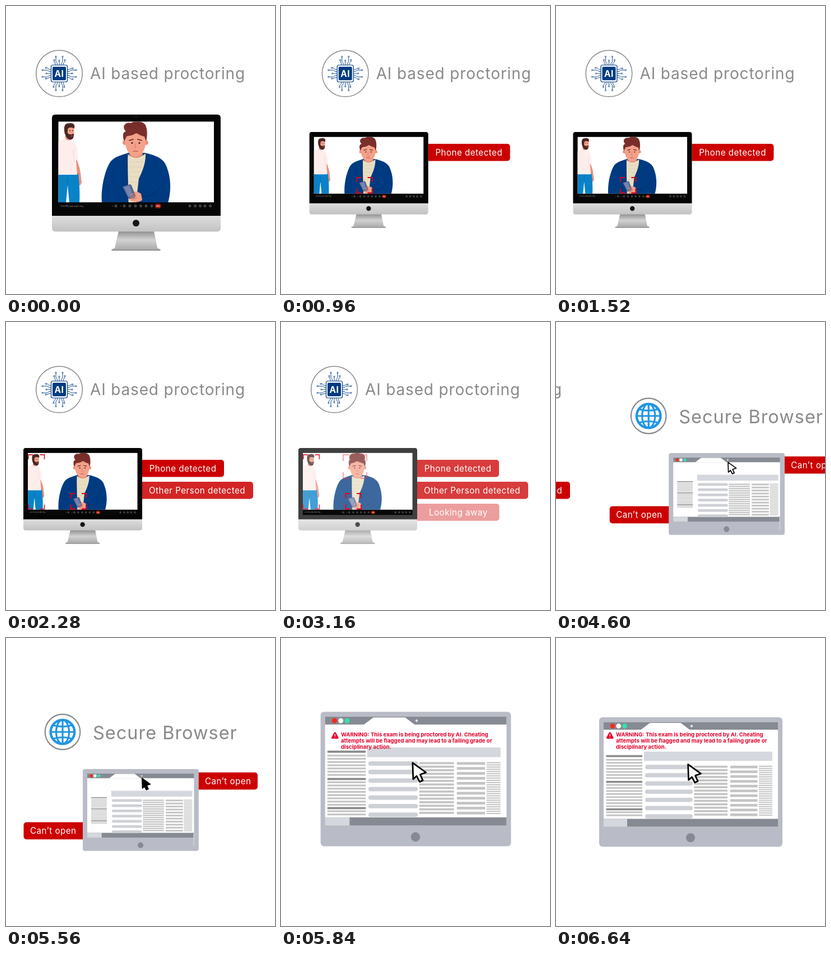
An HTML page that plays this animation: 480x512 px, repeating every 7.44 s.

```html
<!DOCTYPE html>
<html lang="en">
<head>
<meta charset="utf-8">
<title>Proctoring</title>
<style>
  html, body { margin: 0; width: 100%; height: 100%; overflow: hidden; background: #fff; }
  svg { display: block; width: 100vw; height: 100vh; }
  text { font-family: Inter, "Liberation Sans", sans-serif; letter-spacing: .03em; }
  .title { fill: #8a8a8d; }
  .tag { font-size: 15.2px; fill: #fff; }
  .warn { font-size: 9.65px; font-weight: 700; fill: #e4002b; letter-spacing: 0; }
</style>
</head>
<body>
<svg id="stage" viewBox="0 0 480 512" xmlns="http://www.w3.org/2000/svg"></svg>
<script>
const NAVY = '#003c82', RED = '#cc0000', GREY = '#8a8a8d', SKIN = '#f4a18a';
const LOOP = 7440;

const rect = (x, y, w, h, fill, r = 0) =>
  `<rect x="${x}" y="${y}" width="${w}" height="${h}" rx="${r}" fill="${fill}"/>`;
const dot = (x, y, r, fill) => `<circle cx="${x}" cy="${y}" r="${r}" fill="${fill}"/>`;
const path = (d, fill) => `<path d="${d}" fill="${fill}"/>`;
const line = (d, stroke, w = 1) =>
  `<path d="${d}" fill="none" stroke="${stroke}" stroke-width="${w}" stroke-linecap="round" stroke-linejoin="round"/>`;
const text = (x, y, s, cls, more = '') => `<text x="${x}" y="${y}" class="${cls}" ${more}>${s}</text>`;
const group = (body, more = '') => `<g ${more}>${body}</g>`;
const repeat = (n, f) => Array.from({ length: n }, (_, i) => f(i)).join('');

const tag = (x, y, w, tx, s) => rect(x, y, w, 30.5, RED, 5) + text(tx, y + 20.6, s, 'tag');

function bracket(x, y, w, h, c = 8) {
  const r = x + w, b = y + h;
  return `<path fill="none" stroke="#d4061c" stroke-width="1.8" d="M${x} ${y + c}V${y}H${x + c}M${r - c} ${y}H${r}V${y + c}
    M${r} ${b - c}V${b}H${r - c}M${x + c} ${b}H${x}V${b - c}"/>`;
}

function chip() {
  const ends = [[-9, -24], [-6, -30], [0, -23], [6, -30], [10, -24]];
  const wires = ends.map(([x, y], i) =>
    line(`M${(i - 2) * 3.5} -15V-18L${x} -21V${y + 1}`, NAVY, .9) +
    `<circle cx="${x}" cy="${y}" r="1.1" fill="#fff" stroke="${NAVY}" stroke-width=".8"/>`).join('');
  return group(
    repeat(4, i => group(wires, `transform="rotate(${i * 90})"`)) +
    `<rect x="-14.5" y="-15" width="29" height="30" rx="3" fill="#fff" stroke="${NAVY}" stroke-width="1.2"/>` +
    rect(-12, -12, 24, 24, NAVY, 2) +
    text(0, 5.6, 'AI', '', 'font-size="15.5" font-weight="700" fill="#fff" text-anchor="middle"'),
    'transform="translate(95 120)"');
}

const header = () =>
  `<circle cx="95" cy="120" r="41.3" fill="#fff" stroke="${GREY}" stroke-width="1.5"/>` + chip() +
  text(150, 130, 'AI based proctoring', 'title', 'font-size="28"');

function head(away) {
  const body =
    dot(212, 243, 4, '#ee917c') + dot(250, 243, 4, '#ee917c') +
    path('M213 226C211 249 215 264 231 268C247 265 251 249 249 226Z', SKIN) +
    path('M211 241C207 229 209 224 214 223C205 214 214 205 223 208C231 203 246 205 249 212C253 220 252 232 250 241L247 232C240 231 236 227 232 226C226 231 219 230 215 232Z', '#7a2f2b') +
    line('M216 214C224 212 230 216 234 221M229 209C238 210 243 215 244 221', '#602322', .8) +
    line('M220 239L227 237M235 237L242 239', '#5a221f', 1.6) +
    dot(225, 243.5, 1.5, '#35191c') + dot(238, 243.5, 1.5, '#35191c') +
    line('M231 245L229.5 251.5L232.5 252', '#d97866', 1) +
    line('M227 258.5Q231 257 235 258.5', '#a9443f', 1.1);
  return group(body, away ? 'transform="translate(462 0) scale(-1 1)"' : '');
}

const student = away =>
  path('M171 350C169 322 177 290 187 276C195 267 207 265 218 261H248C260 264 277 268 284 280C294 300 296 326 289 350Z', '#003a80') +
  path('M217 263C225 271 241 270 249 262C250 278 243 295 237 307L232 350H218Z', '#e9dec3') +
  line('M221 277H245M221 286H242M221 295H240M221 304H237M221 313H233', '#d9cba9', .8) +
  path('M220 252H244V264C239 272 226 272 220 264Z', '#e88d79') +
  head(away) +
  line('M217 265C215 290 218 320 218 350', '#002c66', 1) +
  line('M278 318C270 334 254 340 243 338', '#002c66', 1) +
  path('M219 333C224 328 236 329 241 334L243 345C236 350 227 350 221 345Z', SKIN) +
  path('M208 321L221 317Q223 317 224 319L231 337Q231 340 228 341L219 343Z', '#56658f') +
  path('M210 322L220 319L227 337L219 340Z', '#7484ad') +
  line('M222 336L230 333M223 340L232 337M225 344L233 341', '#d97d69', 1.6);

const visitor = () =>
  path('M125 268L132 290L135 313Q133 322 129 317L125 296Z', '#ea937e') +
  path('M92 298H129C131 315 132 333 131 350H113L110 318L107 350H92Z', '#0a82c8') +
  line('M110 304V320', '#066aa8', 1) +
  path('M92 242C100 236 106 236 110 235C119 237 125 243 127 254L129 272L125 275L127 300H92Z', '#fdeeec') +
  line('M120 256L122 277', '#ecd3d0', 1) +
  path('M106 224H118V236C114 240 109 239 106 236Z', '#e58f7b') +
  path('M106 214C108 209 120 210 121 215L121.5 228C119 237 111 238 107 231Z', SKIN) +
  path('M105 228C102 213 105 208 113 208.5C121 207 124 212 121.5 218C117 215 112 216 110.5 218L109.5 226Z', '#4b2723') +
  path('M105.5 226L109.5 225C112 230 117 228 121 227C121.5 234 119 238 114.5 237.5C108 236 106 231 105.5 226Z', '#4b2723') +
  dot(114, 221.5, .9, '#2b1716') + dot(119, 221.5, .9, '#2b1716') +
  line('M115.5 231H119', '#c86d60', 1);

function callBar() {
  const icon = x => `<circle cx="${x}" cy="355.5" r="1.8" fill="#222" stroke="#888" stroke-width=".8"/>`;
  return rect(93.5, 349, 277.5, 13, '#080808') +
    text(97.5, 357, '6:30 PM | app-math-msg', '', 'font-size="3.2" fill="#aaa"') +
    [196, 211, 221, 231, 240.5, 250, 260, 328, 337.5, 346.5, 355, 364.5].map(icon).join('') +
    line('M189.5 355.5H191M204.5 355.5H206', '#777', .7) +
    rect(266, 351.5, 10.5, 8, '#b3200f', 4) + line('M269 356Q271.2 354.4 273.5 356', '#fff', 1.1);
}

const desktop = away =>
  path('M201 400H264L270 430L276 433Q276 435 272 435H192Q188 435 188 433L194 430Z', 'url(#stand)') +
  line('M189 433.8H275', '#777', .8) +
  rect(82, 193, 301, 208, 'url(#chin)', 6) +
  path('M82 373V199Q82 193 88 193H377Q383 193 383 199V373Z', '#050505') +
  dot(232, 198, 1.2, '#26262c') +
  rect(93.5, 205.5, 277.5, 143.5, '#fff') +
  group(visitor() + student(away), 'clip-path="url(#screen)"') +
  callBar() + dot(232, 386, 6, '#161616');

const SMALL = 'transform="translate(-26.75 88.07) scale(.7043)"';

function watch(away) {
  const phone = tag(232, 245, 157, 255.7, 'Phone detected');
  const other = tag(232, 284, 209, 255, 'Other Person detected');
  const side = bracket(40, 236, 28.5, 96.5);
  const look = away ? tag(232, 323, 157.5, 264, 'Looking away') : '';
  return phone + group(other, 'class="other"') + look + group(desktop(away), SMALL) +
    bracket(115.5, 305, 27.5, 27.5) + group(side, 'class="other"') +
    (away ? bracket(111, 236, 42, 42, 11) : '');
}

function globe() {
  const ring = (rx, w) => `<ellipse rx="${rx}" ry="21.3" fill="none" stroke="#2196e3" stroke-width="${w}"/>`;
  return `<circle cx="101" cy="167" r="31.3" fill="#fff" stroke="${GREY}" stroke-width="2.2"/>` +
    group(ring(21.3, 4.4) + ring(11.5, 3.2) +
      line('M0 -21V21M-21 0H21M-17 -12Q0 -7 17 -12M-17 12Q0 7 17 12', '#2196e3', 3.2),
      'transform="translate(101 167)"');
}

const bars = (x, y, w, h, step, n, c = '#c4c4c4', r = 0) =>
  repeat(n, i => rect(x, y + i * step, w, h, c, r));

// Parts of the browser; each one zooms from its own place.
const shell = () => rect(77, 141, 327, 230, '#b9bcc6', 6) + dot(240, 355, 8, '#868a92');

const page = () =>
  rect(85, 149.5, 311, 186, '#fff') + rect(85, 149.5, 311, 13.5, '#868a92') +
  rect(85, 321.5, 311, 14, '#868a92') + rect(85, 321.5, 42, 14, '#d4d7dd');

const tabs = () =>
  path('M151 163.5L166 152Q167 151 169 151H221Q223 151 224 152L239 163.5Z', '#fff') +
  dot(101, 156.5, 4.4, '#fb2a1c') + dot(111.7, 156.5, 4.4, '#fff') + dot(122.6, 156.5, 4.4, '#37dfab') +
  line('M240 156.5H244M242 154.5V158.5', '#fff', 1.3);

const columns = () =>
  rect(157, 202, 229, 16.5, '#d4d7dd') + bars(159, 225.6, 85, 7.6, 14.6, 7, '#cdd0d5', 3.8) +
  bars(246.5, 227, 59.5, 3.6, 6.08, 15) + bars(311, 227, 48.5, 4.6, 8.5, 11) + bars(362, 227, 24, 2, 3.78, 24);

const sidebar = () =>
  [208.2, 254, 302.8].map(y => rect(89.5, y, 64.5, 3.5, '#898989')).join('') +
  bars(89.5, 215, 64.5, 3, 5.4, 7) + bars(89.5, 259.7, 64.5, 3, 5.4, 8) + bars(89.5, 308.3, 64.5, 3, 5.4, 2);

const ARROW = 'M0 0L1 28L7 22.5L12 32.5L17.5 30L13 20L23 16.5Z';

// id, drawing, point before, same point after, scale before
const parts = [
  ['shell', shell(), [137, 233], [77, 141], .6325],
  ['page', page(), [145, 241], [85, 149.5], .6125],
  ['columns', columns(), [137, 233], [77, 141], .6325],
  ['sidebar', sidebar(), [152, 283], [89.5, 208.2], .433],
  ['tabs', tabs(), [152, 245.1], [101, 156.5], .64],
];

const warning = () =>
  path('M96.3 167.2Q97.2 167.2 97.7 168L102.6 177Q103.2 179 101.3 179H91.3Q89.4 179 90 177L94.9 168Q95.4 167.2 96.3 167.2Z', '#e4002b') +
  line('M96.3 171V174.3M96.3 176.7V176.8', '#fff', 1.3) +
  ['WARNING: This exam is being proctored by AI. Cheating',
   'attempts will be flagged and may lead to a failing grade or',
   'disciplinary action.'].map((s, i) => text(107, 175.4 + i * 10.6, s, 'warn')).join('');

const stage = document.getElementById('stage');
stage.innerHTML = `<defs>
  <linearGradient id="chin" x2="0" y2="1"><stop offset=".86" stop-color="#dedede"/><stop offset="1" stop-color="#c2c2c2"/></linearGradient>
  <linearGradient id="stand" x2="0" y2="1"><stop offset="0" stop-color="#8f8f8f"/><stop offset=".45" stop-color="#d2d2d2"/><stop offset="1" stop-color="#a6a6a6"/></linearGradient>
  <clipPath id="screen"><rect x="93.5" y="205.5" width="277.5" height="143.5"/></clipPath></defs>` +
  group(header() + desktop(false), 'id="intro"') +
  group(header() + group(watch(false), 'id="before"') + group(watch(true), 'id="after"') +
    group(callBar(), SMALL) + bracket(115.5, 305, 27.5, 27.5), 'id="watch"') +
  group(
    group(globe() + text(155, 179.5, 'Secure Browser', 'title', 'font-size="32.5"') +
      tag(335, 239, 114, 355, 'Can’t open') + tag(31.5, 327.5, 115, 43, 'Can’t open'), 'id="extras"') +
    parts.map(([id, body]) => group(body, `id="${id}"`)).join('') +
    group(rect(334.5, 347, 1, 23, '#dfe1e5'), 'id="edge"') +
    group(warning(), 'id="warning"') +
    `<path id="arrow" d="${ARROW}" stroke="#000" stroke-width="2.7" stroke-linejoin="round"/>`, 'id="secure"');

const $ = id => document.getElementById(id);
const clamp = v => Math.max(0, Math.min(1, v));
const mix = (a, b, p) => a + (b - a) * p;
const fade = (id, v) => $(id).setAttribute('opacity', clamp(v).toFixed(3));
const others = [...document.querySelectorAll('.other')];

// Spring with stiffness 300, damping 20, mass 1.
function spring(ms) {
  if (ms <= 0) return 0;
  if (ms > 760) return 1;
  const t = ms / 1000, w = Math.sqrt(200);
  return 1 - Math.exp(-10 * t) * (Math.cos(w * t) + 10 / w * Math.sin(w * t));
}
const easeOut = x => 1 - (1 - clamp(x)) ** 1.7;

function slide(id, x, shown) {
  const el = $(id);
  el.setAttribute('transform', `translate(${x.toFixed(2)} 0)`);
  el.style.display = shown ? '' : 'none';
}

function grow(id, [x0, y0], [x1, y1], scale, p) {
  $(id).setAttribute('transform',
    `translate(${mix(x0, x1, p)} ${mix(y0, y1, p)}) scale(${mix(scale, 1, p)}) translate(${-x1} ${-y1})`);
}

function draw(t) {
  const toWatch = spring(t - 816.5), toSecure = spring(t - 4474.5);
  slide('intro', -480 * toWatch, t < 1600);
  slide('watch', 480 * (1 - toWatch) - 480 * toSecure, t > 800 && t < 5300);
  slide('secure', 480 * (1 - toSecure), t > 4460);

  const second = easeOut((t - 1945) / 500);
  others.forEach(el => el.setAttribute('opacity', second.toFixed(3)));
  const third = easeOut((t - 3098) / 255);
  fade('before', 1 - third);
  fade('after', third);

  const zoom = spring(t - 5630);
  parts.forEach(([id, , from, to, scale]) => grow(id, from, to, scale, zoom));
  fade('extras', 1 - zoom);
  fade('edge', 1 - zoom * 4);
  fade('warning', zoom);
  const tone = t < 5560 ? 255 : Math.round(255 * clamp(zoom));
  $('arrow').setAttribute('fill', `rgb(${tone},${tone},${tone})`);
  $('arrow').setAttribute('transform',
    `translate(${mix(242.8, 235.6, zoom)} ${mix(249.4, 224.6, zoom)}) scale(${mix(.6325, 1, zoom)})`);
}

const start = performance.now();
function tick() {
  draw((performance.now() - start) % LOOP);
  requestAnimationFrame(tick);
}
tick();
</script>
</body>
</html>
```
